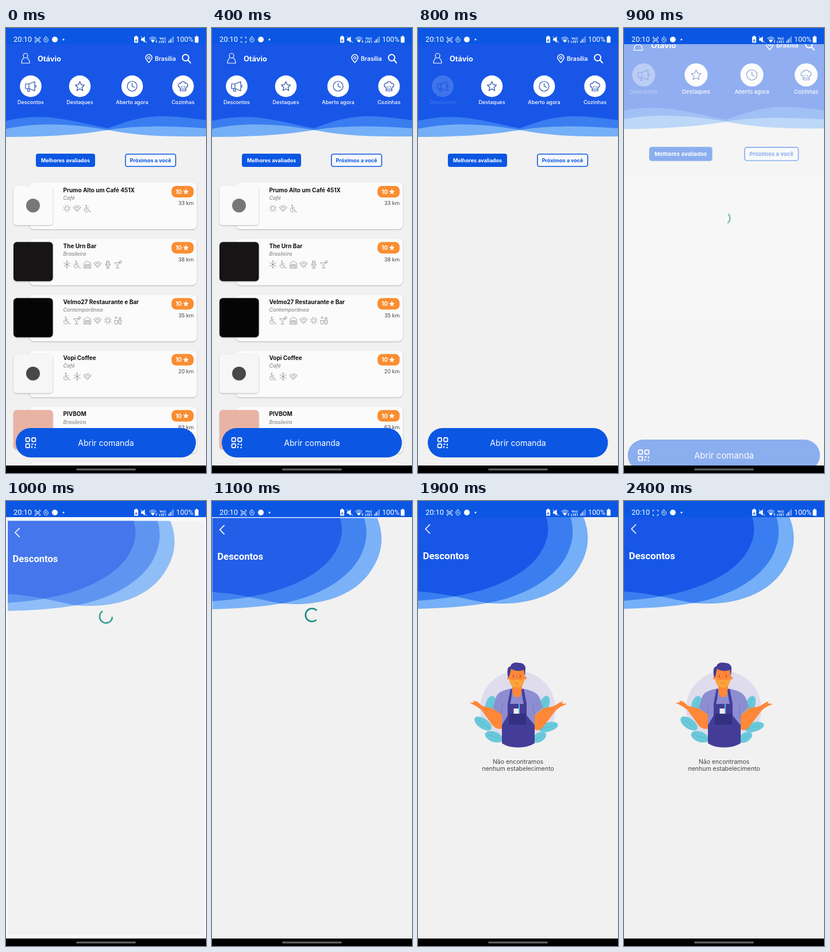
An HTML page for the animation above (2.7 s loop, 348 px wide and 772 px high).

```html
<!DOCTYPE html>
<html lang="pt-BR">
<head>
<meta charset="utf-8">
<title>Descontos</title>
<style>
  html, body { margin: 0; width: 100%; height: 100%; overflow: hidden; background: #fafafa; }
  svg { display: block; }
  #stage { width: 100vw; height: 100vh; }
  text { font-family: Inter, sans-serif; }
  .roboto { font-family: Roboto, sans-serif; }
  .line { fill: none; stroke-linecap: round; stroke-linejoin: round; }
  .light { fill: #75aff7; } .mid { fill: #397df0; } .dark { fill: #1856e8; }
  .label { font-size: 9px; font-weight: 500; fill: #fff; text-anchor: middle; }
  .tab { font-size: 9px; font-weight: 700; text-anchor: middle; }
  .name { font-size: 10px; font-weight: 700; fill: #111; }
  .kind { font-size: 9px; font-style: italic; fill: #777; }
  .km { font-size: 9.1px; fill: #444; text-anchor: end; }
  .score { font-size: 10px; font-weight: 700; fill: #fff; }
  .amenity { stroke: #707070; stroke-width: .65; }
  .raised { filter: drop-shadow(0 1px 1px rgba(0,0,0,.25)); }
</style>
</head>
<body>
<svg id="stage" viewBox="0 0 348 772">
  <g id="home">
    <rect y="28" width="348" height="732" fill="#f1f1f1"/>
    <g id="waves"></g>
    <g class="line" stroke="#fff" stroke-width="1.2">
      <circle cx="34" cy="48" r="4"/>
      <path d="M31 52C28 54 27 57 27 61H41C41 57 40 54 37 52"/>
      <path stroke-width="1.5" d="M248.5 60C245 56 243 54 243 51.5a5.5 5.5 0 0 1 11 0C254 54 252 56 248.5 60Z"/>
      <circle cx="248.5" cy="51.5" r="2"/>
      <path stroke-width="2" d="M317 56L321 60.5"/>
      <circle cx="312.5" cy="51.5" r="5.5" stroke-width="2"/>
    </g>
    <text x="55" y="58" font-size="12.8" font-weight="700" fill="#fff">Otávio</text>
    <text x="259" y="57" font-size="10.3" font-weight="600" fill="#fff">Brasília</text>
    <g id="shortcuts"></g>
    <rect x="52" y="218" width="103" height="23" rx="4" fill="#0b57e3"/>
    <text class="tab" x="103.5" y="233" fill="#fff">Melhores avaliados</text>
    <rect x="207.8" y="218.8" width="87.5" height="21.5" rx="3.5" fill="#f7f8fb" stroke="#0b57e3" stroke-width="1.6"/>
    <text class="tab" x="251.5" y="233" fill="#0b57e3">Próximos a você</text>
    <g id="list"></g>
    <rect x="17" y="694" width="313.5" height="51" rx="25.5" fill="#0b57e3"/>
    <g class="line" stroke="#fff" stroke-width="1.8">
      <rect x="34.5" y="711" width="6.5" height="6.5" rx="1.5"/>
      <rect x="45" y="711" width="6.5" height="6.5" rx="1.5"/>
      <rect x="34.5" y="721.5" width="6.5" height="6.5" rx="1.5"/>
      <path d="M45 722h2M51 722v2M45 728v-2M50 728h1"/>
    </g>
    <text x="174" y="724.7" font-size="14" fill="#fff" text-anchor="middle">Abrir comanda</text>
  </g>

  <g id="page">
    <g id="cover">
      <rect y="28" width="348" height="732" fill="#f1f1f1"/>
      <g id="blobs"></g>
      <path class="line" stroke="#fff" stroke-width="1.7" d="M20.5 41L13 48.500L20.5 56"/>
      <text class="roboto" x="8.5" y="100.5" font-size="16.9" font-weight="700" fill="#fff">Descontos</text>
    </g>
    <circle id="spinner" class="line" style="stroke-linecap:butt" r="11.3" pathLength="360" stroke="#0b8579" stroke-width="2.6"/>
    <g id="empty">
      <circle cx="173.5" cy="360.5" r="65.5" fill="#dfdced"/>
      <g id="leaves" fill="#69c9da"></g>
      <path fill="#8d8dd1" d="M163 325C150 328 139 331 136 340L130 359 146 372V390H203V372L217 357 211 340C206 331 194 328 181 325Z"/>
      <path class="line" stroke="#7775bf" d="M147 352L145 376M200 352L203 376"/>
      <g fill="#ff8738">
        <path d="M111 355C119 358 125 357 131 361L146 370V395C137 397 131 392 126 384L110 362 101 356 90 350 98 349 96 346 103 348Z"/>
        <path d="M238 355C229 359 223 357 217 360L203 372V396C211 401 217 393 223 385L240 363 248 357 259 352 250 351 252 347 244 351Z"/>
        <path d="M164 315H181V328C181 335 176 341 172 341S164 335 164 328Z"/>
      </g>
      <path fill="#433d98" d="M161 326L164 327 161 352H183L180 327 184 326 189 352V372L203 389V420C190 430 158 430 146 420V389L156 372V352Z"/>
      <path fill="#8d8dd1" d="M164 337L160 352H184L181 337 172 343Z"/>
      <rect x="166.5" y="360" width="10" height="10" fill="#f2e9ed"/>
      <path class="line" stroke="#58bfd5" stroke-width="2" d="M176 353V368"/>
      <path fill="#343080" d="M158 369H188V386Q188 388 186 388H160Q158 388 158 386Z"/>
      <path fill="#ff8738" d="M158 292Q172 284 186 292L185 311Q183 323 172 324Q161 323 159 311Z"/>
      <path fill="#fba43b" d="M159 308Q166 313 172 309Q179 313 185 308L184 315Q181 324 172 324Q162 323 160 315Z"/>
      <g fill="#ff8738"><circle cx="157.5" cy="307" r="2.5"/><circle cx="186.5" cy="307" r="2.5"/></g>
      <path fill="#433d98" d="M157 306C154 294 156 287 161 287C162 281 169 279 177 281C183 281 188 286 187 291L186 304 184 293C177 296 168 295 162 291L159 304Z"/>
      <path class="line" stroke="#d8602b" stroke-width=".8" d="M164 301.500h4M176 301.500h4M172 305v4M169 316h6"/>
      <g fill="#3b2d68"><circle cx="166" cy="304.5" r=".9"/><circle cx="178" cy="304.5" r=".9"/></g>
      <g font-size="10.5" fill="#444" text-anchor="middle">
        <text x="174" y="455.5">Não encontramos</text>
        <text x="174" y="468">nenhum estabelecimento</text>
      </g>
    </g>
  </g>

  <rect width="348" height="28" fill="#0b57e3"/>
  <g fill="#fff">
    <text class="roboto" x="13" y="24.3" font-size="12.9">20:10</text>
    <text class="roboto" x="296" y="24.3" font-size="12.5">100%</text>
    <text class="roboto" x="267" y="19.5" font-size="6" font-weight="700">Vo))</text>
    <text class="roboto" x="266" y="25.5" font-size="6" font-weight="700">LTE1</text>
    <circle cx="85" cy="20" r="5"/>
    <circle cx="100" cy="20" r="1.5"/>
    <path d="M223 15h2v-1.500h3V15h2v10.500h-7ZM328.500 15h2v-1.500h2.500V15h2v10.500h-6.500Z"/>
    <path d="M235 18h2.500l4-3.500v11l-4-3.500H235ZM252 21.500Q255.500 18.500 259 21.500L255.500 25.500ZM282.500 25.500v-3h1.500v3ZM285 25.500v-6h1.500v6Z"/>
    <path opacity=".6" d="M287.500 25.500v-8.500h1.500v8.500ZM290 25.500v-11h1.500v11Z"/>
    <g class="line" stroke="#fff">
      <path d="M50.500 18v-2h2M57.500 16h2v2M50.500 23v2h2M57.500 25h2v-2"/>
      <path d="M69 16C65 16 64.500 24.500 69.500 24.500S74 18 71 17L69 14.500M69 18v3h2"/>
      <path d="M235 15L245 25.500M249.500 18Q255.500 13 261.500 18M251 20Q255.500 16 260 20"/>
      <path stroke="#0b57e3" d="M225 22.500l1.500-3 1.500 3Z"/>
      <path d="M262 21v4M260.500 23.500l1.500 1.500"/>
      <g id="record"><rect x="52.5" y="18.5" width="5" height="4"/><circle cx="55" cy="20.5" r=".6"/></g>
    </g>
  </g>
  <rect y="759" width="348" height="13"/>
  <rect x="122" y="764.2" width="104" height="3.2" rx="1.6" fill="#626262"/>
</svg>

<script>
const $ = id => document.getElementById(id);
const show = (id, on) => $(id).setAttribute("display", on ? "inline" : "none");

// Three overlapping outlines: one layer is light, two are mid, three are dark.
function layered(id, a, b, c) {
  $(id).innerHTML = `<clipPath id="${id}Clip"><path d="${a}"/></clipPath>
    <path class="light" d="${a}"/><path class="light" d="${b}"/><path class="mid" d="${c}"/>
    <g clip-path="url(#${id}Clip)"><path class="mid" d="${b}"/><path class="dark" d="${c}"/></g>`;
}

layered("waves",
  "M0 28V175C55 163 118 166 177 177S285 189 348 188V28Z",
  "M0 28V189C60 189 125 186 177 177S285 170 348 174V28Z",
  "M0 28V161C30 154 60 152 92 157C125 162 150 169 177 174C205 164 230 154 270 153C300 153 325 157 348 160V28Z");

layered("blobs",
  "M0 28V157C45 159 85 171 121 177C187 183 246 164 275 123C299 89 300 58 288 28Z",
  "M0 28V187C45 186 85 183 121 177C196 163 246 127 262 87C271 65 271 46 265 28Z",
  "M0 28V173C24 171 46 169 66 165C141 152 197 122 217 83C227 64 229 47 223 28Z");

const shortcuts = [
  [43, "Descontos", "M-9-4H-3L7-8V8L-3 4H-9ZM-3-4V4M-6 4L-5 9H-2L-3 4M9-2V2"],
  [128.5, "Destaques", "M0-8L2.400-2.700 8-2 3.800 1.800 5 7.500 0 4.600-5 7.500-3.800 1.800-8-2-2.400-2.700Z"],
  [219.5, "Aberto agora", "M8.500 0A8.500 8.500 0 1 1-8.500 0A8.500 8.500 0 1 1 8.500 0M0-5V0L4 2"],
  [308, "Cozinhas", "M-5 2C-10 1-9-6-4-5C-3-9 3-9 4-5C9-6 10 1 5 2V8H-5ZM-5 5H5M-2 2V0M2 2V0"]
];
$("shortcuts").innerHTML = shortcuts.map(([x, label, icon], i) => `
  <g id="shortcut${i}"><circle cx="${x}" cy="101" r="18.8" fill="#fff"/>
    <path class="line" transform="translate(${x} 101)" stroke="#2449a8" stroke-width="1.2" d="${icon}"/>
    <text class="label" x="${x}" y="131.7">${label}</text></g>`).join("");

const ring = r => `M${r} 0A${r} ${r} 0 1 1-${r} 0A${r} ${r} 0 1 1 ${r} 0`;
const spokes = (count, from, to) => Array.from({ length: count }, (_, i) => {
  const a = (i + .5) * 2 * Math.PI / count;
  const at = r => `${(r * Math.cos(a)).toFixed(2)} ${(r * Math.sin(a)).toFixed(2)}`;
  return `M${at(from)}L${at(to)}`;
}).join("");
const amenities = {
  sun: ring(3.5) + spokes(8, 4.8, 6.5),
  snow: spokes(6, 0, 6.5) + "M-1.500-6L0-4.500 1.500-6M-1.500 6L0 4.500 1.500 6",
  wifi: "M-6.500-2Q0-7.500 6.500-2L0 5.500ZM-4.500 0Q0-4 4.500 0M-2.500 2.500Q0 0 2.500 2.500",
  wheel: "M-2-6A1 1 0 1 1-2-4A1 1 0 1 1-2-6M-2-3V2H2L4 6H6M-2-1H2M-4-1A4 4 0 1 0 2 4",
  house: "M-6 6V-2L0-6 6-2V6ZM-3.500 6V0H3.500V6M-3.500 2H3.500M-1.500 4H1.500",
  mic: "M-2-6H2V1H-2ZM-4-1Q-4 4 0 4T4-1M0 4V6.500M-3 6.500H3M-2-3H2",
  drink: "M-6-3H4L-1 2ZM-1 2V6M-4 6H2M1-3L4-6.500M3-3A2 2 0 1 0 3-6",
  kids: "M-5-5A1.500 1.500 0 1 0-2-5A1.500 1.500 0 1 0-5-5M-6 0H-1V6H-5ZM2-5H5V-2H2ZM1 0H6V3H5V6.500H2V3H1Z"
};
const places = [
  ["Prumo Alto um Café 451X", "Café", 33, "#fafafa", "sun wifi wheel", "#777"],
  ["The Urn Bar", "Brasileira", 38, "#161415", "snow wheel house wifi mic drink"],
  ["Velmo27 Restaurante e Bar", "Contemporânea", 35, "#050505", "wheel drink house wifi sun kids"],
  ["Vopi Coffee", "Café", 20, "#f6f6f6", "wheel snow wifi", "#484848"],
  ["PIVBOM", "Brasileira", 63, "#e9b3a4", ""]
];
const cardBack = y => `<rect class="raised" x="41" y="${y}" width="291" height="81" rx="8" fill="#fbfbfc"/>`;
const star = "M0-5L1.500-1.600 5-1.400 2.300.900 3.200 4.500 0 2.500-3.200 4.500-2.300.900-5-1.400-1.500-1.600Z";
$("list").innerHTML = places.map(([name, kind, km, tile, icons, mark], i) => {
  const y = 268 + 97.2 * i;
  const row = icons.split(" ").filter(Boolean).map((key, k) =>
    `<path class="line amenity" transform="translate(${106 + 17.8 * k} ${y + 45})" d="${amenities[key]}"/>`).join("");
  return `${cardBack(y)}
    <rect class="raised" x="13" y="${y + 6}" width="68.5" height="68" rx="6" fill="${tile}"/>
    ${mark ? `<circle cx="47" cy="${y + 40}" r="12" fill="${mark}"/>` : ""}
    <text class="name" x="99.5" y="${y + 16.5}">${name}</text>
    <text class="kind" x="99.5" y="${y + 29.7}">${kind}</text>${row}
    <rect x="288" y="${y + 6}" width="38.5" height="20" rx="8" fill="#fb8d30"/>
    <text class="score" x="295" y="${y + 19.8}">10</text>
    <path fill="#fff" transform="translate(313 ${y + 16})" d="${star}"/>
    <text class="km" x="326.5" y="${y + 39.3}">${km} km</text>`;
}).join("") + cardBack(754);

const leaves = [[127, 357, 10, 19, 8], [113, 386, 9, 17, -55], [132, 409, 9, 16, -70],
                [218, 357, 9, 20, 22], [227, 392, 8, 17, 75], [211, 410, 8, 13, 60]];
$("leaves").innerHTML = leaves.map(([x, y, rx, ry, turn]) =>
  `<g transform="translate(${x} ${y}) rotate(${turn})"><ellipse rx="${rx}" ry="${ry}"/>
   <path class="line" stroke="#52b7cc" stroke-width=".7" d="M0 ${-ry + 4}V${ry}"/></g>`).join("");

// Per step of 100 ms: [scale, opacity]
const homePose = { 9: [1.067, .46] };
const pagePose = { 9: [.93, .5], 10: [.982, .8], 11: [.996, .95] };
const touchOpacity = { 7: .5, 8: .17, 9: .4 };

function pose(id, [scale, opacity]) {
  $(id).setAttribute("transform", `translate(174 394) scale(${scale}) translate(-174 -394)`);
  $(id).setAttribute("opacity", opacity);
}

// Cubic easing with control points (.2,0) and (.1,1), reaching 1 at half a turn.
function grow(p) {
  if (p >= .5) return 1;
  let lo = 0, hi = 1;
  for (let i = 0; i < 20; i++) {
    const u = (lo + hi) / 2, v = 1 - u;
    if (.6 * u * v * v + .3 * u * u * v + .5 * u ** 3 < p) lo = u; else hi = u;
  }
  return lo * lo * (3 - 2 * lo);
}
const shrink = p => p < .5 ? 0 : 1 - grow(1 - p);

function spin(age, y) {
  const p = age / 1333 % 1;
  const tail = 270 * shrink(p), length = Math.max(3, 270 * grow(p) - tail);
  const turn = -90 + age * .162 + 90 * p + tail;
  $("spinner").setAttribute("transform", `translate(174 ${y}) rotate(${turn})`);
  $("spinner").setAttribute("stroke-dasharray", `${length} ${360 - length}`);
}

function render(step) {
  const blink = step % 10;
  $("record").setAttribute("opacity", blink === 3 || blink === 7 ? .5 : blink > 3 && blink < 7 ? 0 : 1);
  show("home", step < 10);
  show("page", step > 8);
  show("list", step < 8);
  show("cover", step > 9);
  show("spinner", step < 18);
  show("empty", step >= 18);
  pose("home", homePose[step] || [1, 1]);
  pose("page", pagePose[step] || [1, 1]);
  $("shortcut0").setAttribute("opacity", touchOpacity[step] || 1);
  if (step > 8) spin((step - 8) * 200, step === 9 ? 325 : 197);
}

function tick() {
  render(Math.floor(performance.now() % 2700 / 100));
  requestAnimationFrame(tick);
}
tick();
</script>
</body>
</html>
```
